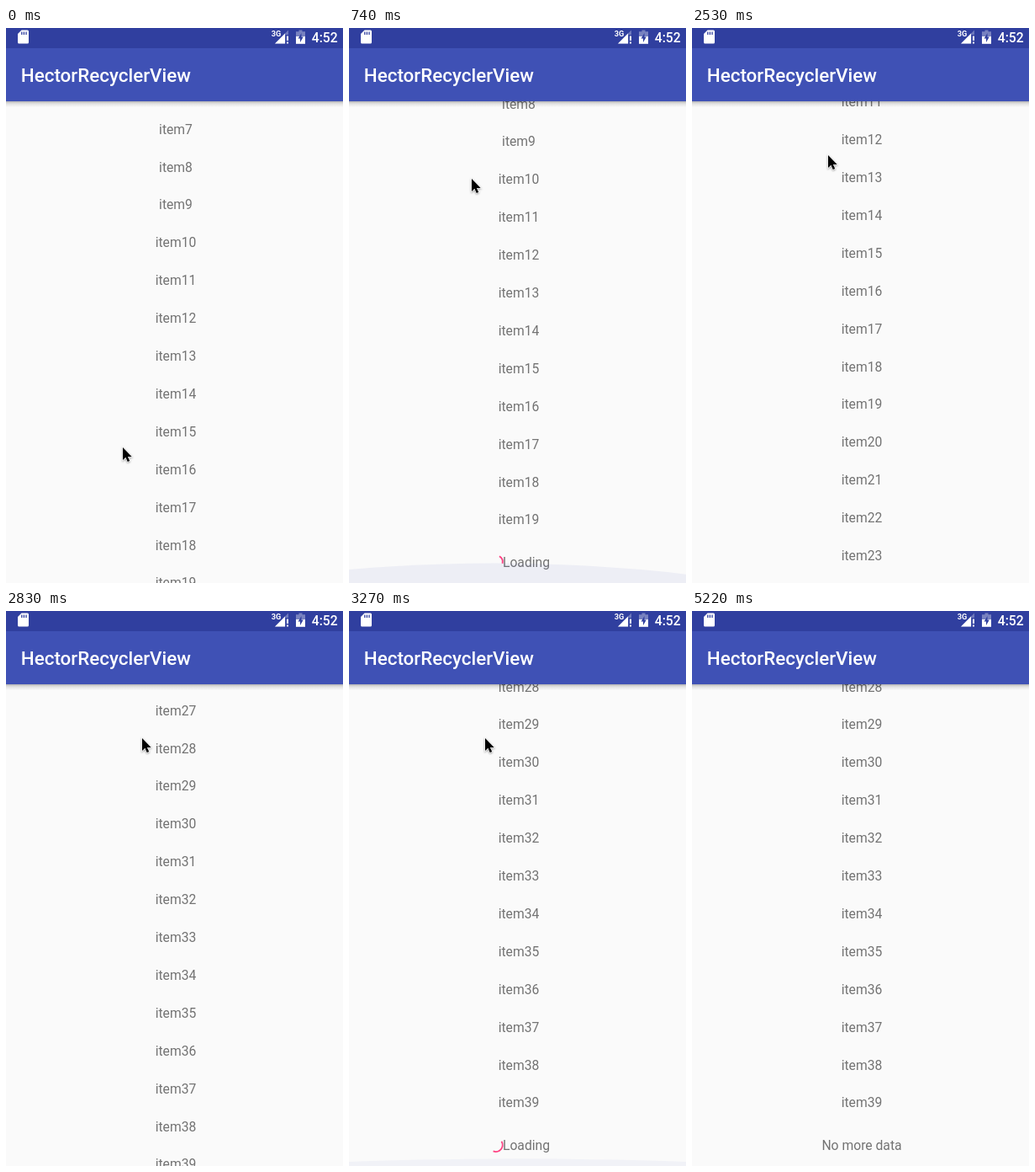
Write an HTML page that moves like this. It is 401 px wide and 659 px high and loops after 5.82 s.

```html
<!DOCTYPE html>
<html lang="en">
<head>
<meta charset="utf-8">
<title>Endless list</title>
<style>
  html, body { margin: 0; height: 100%; overflow: hidden; background: #fafafa; }
  svg { display: block; width: 401px; height: 659px; }
  text { font: 15.7px Roboto, sans-serif; }
  .list { fill: #737373; text-anchor: middle; }
  .bar { fill: #fff; }
  .bar text { font-weight: 500; }
  .bar .title { font-size: 22.4px; }
  .bar .net { font-size: 9.2px; font-weight: 700; }
  #cursor { filter: drop-shadow(0 1px 1px rgba(0, 0, 0, .4)); }
</style>
</head>
<body>
<svg viewBox="0 0 401 659">
  <defs>
    <linearGradient id="shade" x2="0" y2="1">
      <stop stop-color="#000" stop-opacity=".28"/>
      <stop offset=".4" stop-color="#000" stop-opacity=".1"/>
      <stop offset="1" stop-color="#000" stop-opacity="0"/>
    </linearGradient>
  </defs>
  <rect width="401" height="659" fill="#fafafa"/>

  <g id="items" class="list"></g>
  <g id="loading" class="list">
    <circle id="ring" cx="174.8" cy="634" r="8" fill="none" stroke="#ff4081" stroke-width="1.8"/>
    <text x="211" y="639.6">Loading</text>
  </g>
  <text id="done" class="list" x="202" y="639.6">No more data</text>
  <ellipse id="glow" rx="601" fill="#3f51b5"/>

  <rect y="87" width="401" height="7" fill="url(#shade)"/>
  <rect y="24" width="401" height="63" fill="#3f51b5"/>
  <rect width="401" height="24" fill="#303f9f"/>
  <g class="bar">
    <text class="title" x="17.8" y="64">HectorRecyclerView</text>
    <path d="M18.5 2.5H25.5Q27 2.5 27 4V17Q27 18.500 25.500 18.500H15.500Q14 18.500 14 17V7Z"/>
    <path d="M18.800 4.500V8M21.400 4.500V8M24 4.500V8" stroke="#303f9f" stroke-width="1.300"/>
    <text class="net" x="315.800" y="10">3G</text>
    <path d="M320 18.500L336 2.500V8H332.500V18.500Z" opacity=".3"/>
    <path d="M320 18.500L332 6.500V18.500Z"/>
    <path d="M334 9.500h2v5.500h-2zM334 16.500h2v2h-2z"/>
    <path d="M348.500 2.500h4v1.700h3.500V10H345V4.200h3.500z" opacity=".35"/>
    <path d="M345 10h11v8.800h-11z"/>
    <path d="M351.500 6L347.600 12.600H350V17L353.800 10.500H351.500Z" fill="#303f9f"/>
    <text x="363.800" y="17">4:52</text>
  </g>

  <path id="cursor" d="M0 0V15L3.400 11.800L5.700 17L8.200 16L5.900 10.900H10.700Z" stroke="#fff" stroke-width="1.200" paint-order="stroke"/>
</svg>
<script>
const LOOP = 5820, TICK = 149, PITCH = 44.9;
const $ = id => document.getElementById(id);
const show = (el, on) => el.setAttribute('visibility', on ? 'visible' : 'hidden');

// Keys are [tick, ...values]
const scrollKeys = [[0, 0], [1, 22], [2, 75], [15, 75], [16, 108], [17, 212], [18, 600], [19, 900], [20, 973]];
const cursorKeys = [
  [0, 139, 498], [1, 140, 450], [2, 143, 300], [3, 146, 179], [12, 146, 179],
  [13, 145, 290], [14, 145, 398], [15, 145, 398], [16, 150, 310], [17, 162, 151],
  [31, 162, 151], [32, 254, 415], [33, 263, 488], [34, 317, 641]
];
const glows = [
  { start: 1, peak: 3, end: 8, x: 173, scale: .806, alpha: .185 },
  { start: 19, peak: 20, end: 23, x: 200.5, scale: .968, alpha: .39 }
];

const rows = [];
for (let n = 7; n < 40; n++) {
  const row = document.createElementNS('http://www.w3.org/2000/svg', 'text');
  row.textContent = 'item' + n;
  row.setAttribute('x', 202);
  row.setAttribute('y', 125.6 + (n - 7) * PITCH);
  $('items').append(row);
  rows.push(row);
}

function at(keys, f) {
  const i = keys.findIndex(k => k[0] >= f);
  if (i < 0) return keys[keys.length - 1].slice(1);
  if (i === 0) return keys[0].slice(1);
  const a = keys[i - 1], b = keys[i], u = (f - a[0]) / (b[0] - a[0]);
  return a.slice(1).map((v, j) => v + (b[j + 1] - v) * u);
}

function drawGlow(f) {
  const g = glows.find(g => f > g.start && f < g.end);
  show($('glow'), g);
  if (!g) return;
  const level = f <= g.peak ? (f - g.start) / (g.peak - g.start) : ((g.end - f) / (g.end - g.peak)) ** 2;
  const s = g.scale * level;
  $('glow').setAttribute('cx', g.x);
  $('glow').setAttribute('cy', 659 + 520.4 * s);
  $('glow').setAttribute('ry', 601 * s);
  $('glow').setAttribute('opacity', g.alpha * level);
}

const smooth = u => u * u * (3 - 2 * u);

function drawRing(age) {
  const u = age / 1333 % 1;
  const head = smooth(Math.min(1, 2 * u)) * 250, tail = smooth(Math.max(0, 2 * u - 1)) * 250;
  const turn = 5 + tail + age * .175;
  const arc = (40 + head - tail) * Math.PI / 180 * 8;
  $('ring').setAttribute('stroke-dasharray', arc + ' 60');
  $('ring').setAttribute('transform', `rotate(${turn - 90} 174.8 634)`);
}

function draw(f) {
  $('items').setAttribute('transform', `translate(0 ${-at(scrollKeys, f)[0]})`);
  rows.forEach((row, i) => show(row, i < 13 || f >= 11));

  const first = f >= 4 && f < 11, second = f >= 20 && f < 26;
  show($('loading'), first || second);
  show($('done'), f >= 26);
  drawRing(Math.max(0, f - (second ? 20 : 4)) * TICK);
  drawGlow(f);

  show($('cursor'), f < 35);
  $('cursor').setAttribute('transform', `translate(${at(cursorKeys, f)})`);
}

function loop() {
  draw(Math.floor((performance.now() % LOOP + 10) / TICK));
  requestAnimationFrame(loop);
}
loop();
</script>
</body>
</html>
```
